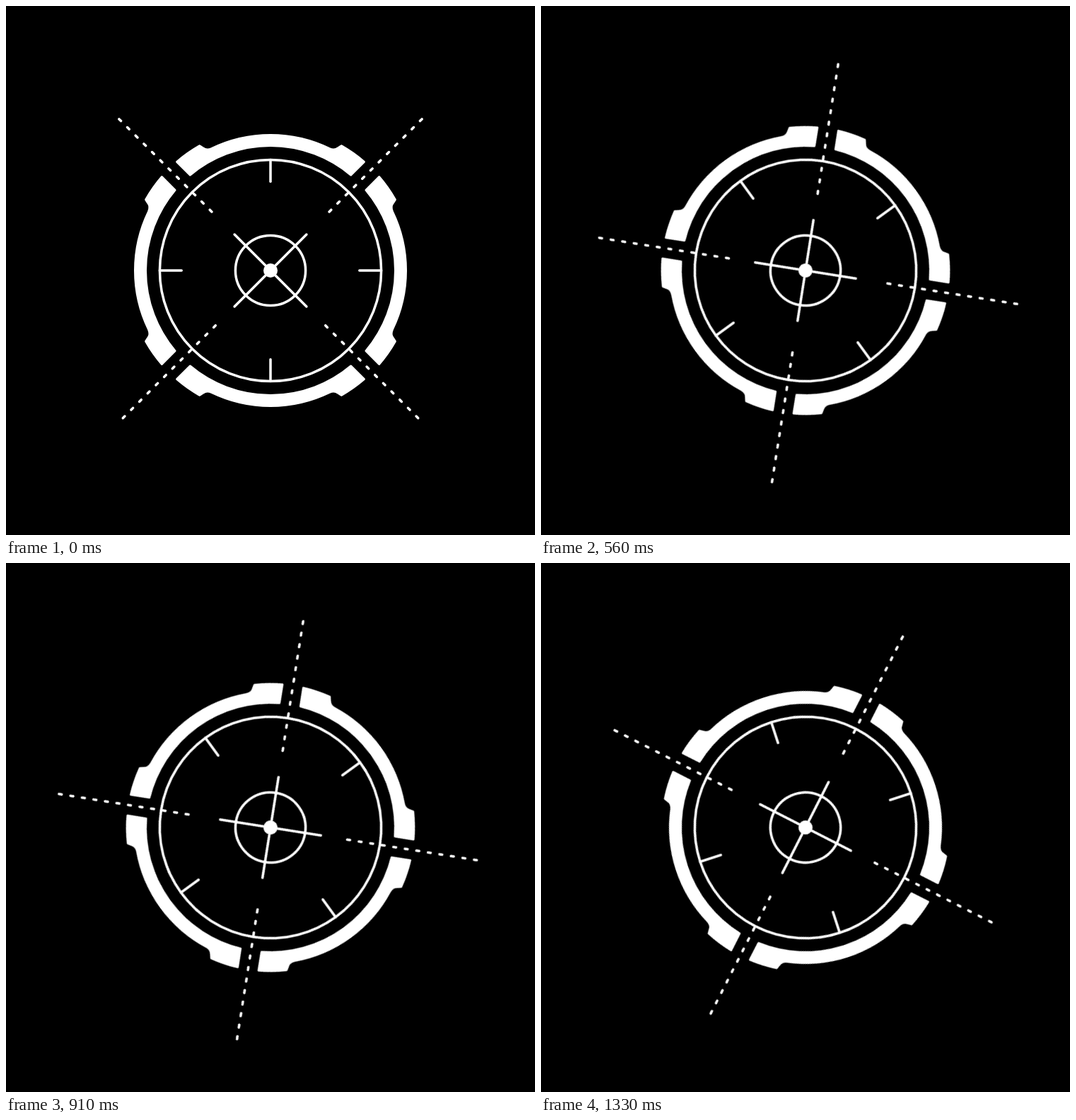
Write an HTML page that moves like this. It is 748 by 748 pixels and loops after 1400 ms.

```html
<!DOCTYPE html>
<html lang="en">
<head>
<meta charset="utf-8">
<title>Rotating reticle</title>
<style>
  html, body { margin: 0; width: 100%; height: 100%; overflow: hidden; background: #000; }
  svg { display: block; width: 100vw; height: 100vh; }
  #dial { transform-origin: 0 0; fill: none; stroke: #fff; stroke-width: 3.5; stroke-linecap: round; }
  .solid { fill: #fff; stroke-width: 3; stroke-linejoin: round; }
  .dashed { stroke-dasharray: 3.8 12.7; }
</style>
</head>
<body>
<svg viewBox="0 0 748 748"><g id="dial"></g></svg>
<script>
const LOOP = 1400, STEPS = 20;
const dial = document.getElementById('dial');

function add(tag, attrs) {
  const el = document.createElementNS('http://www.w3.org/2000/svg', tag);
  for (const key in attrs) el.setAttribute(key, attrs[key]);
  dial.append(el);
}

// Angles are in degrees, clockwise from straight up.
function polar(r, deg) {
  const a = deg * Math.PI / 180;
  return (r * Math.sin(a)).toFixed(2) + ' ' + (-r * Math.cos(a)).toFixed(2);
}

const circle = (r, attrs) => add('circle', { r, ...attrs });
const spoke = (from, to, deg, attrs) =>
  add('path', { d: `M${polar(from, deg)}L${polar(to, deg)}`, ...attrs });

// One quarter of the outer ring, with a raised tab at each end.
function segment(turn) {
  const inner = 176.5, outer = 191.5, tab = 202.8, gap = 15;
  const edge = r => 45 - Math.asin(gap / r) * 180 / Math.PI;
  const at = (r, deg) => polar(r, turn + deg);
  const arc = (r, deg, sweep) => `A${r} ${r} 0 0 ${sweep} ${at(r, deg)}`;
  const d = `M${at(inner, -edge(inner))}L${at(tab, -edge(tab))}` +
    arc(tab, -29.6, 1) +
    `L${at(197.5, -28.8)}Q${at(192, -28.1)} ${at(outer, -25.8)}` +
    arc(outer, 25.8, 1) +
    `Q${at(192, 28.1)} ${at(197.5, 28.8)}L${at(tab, 29.6)}` +
    arc(tab, edge(tab), 1) +
    `L${at(inner, edge(inner))}` +
    arc(inner, -edge(inner), 0) + 'Z';
  add('path', { d, class: 'solid' });
}

for (let i = 0; i < 4; i++) {
  const turn = i * 90, arm = turn - 45;
  const start = i < 2 ? 117.5 : 109.9;
  segment(turn);
  spoke(125.8, 156.6, turn);
  spoke(0, 72, arm);
  spoke(start, start + 185.3, arm, { class: 'dashed' });
}
circle(156.6);
circle(49.6);
circle(10, { fill: '#fff', stroke: 'none' });

const pose = deg => `translate(374px, 374px) rotate(${deg}deg)`;
dial.animate(
  { transform: [pose(0), pose(360)] },
  { duration: LOOP, iterations: Infinity, easing: `steps(${STEPS})` }
);
</script>
</body>
</html>
```
